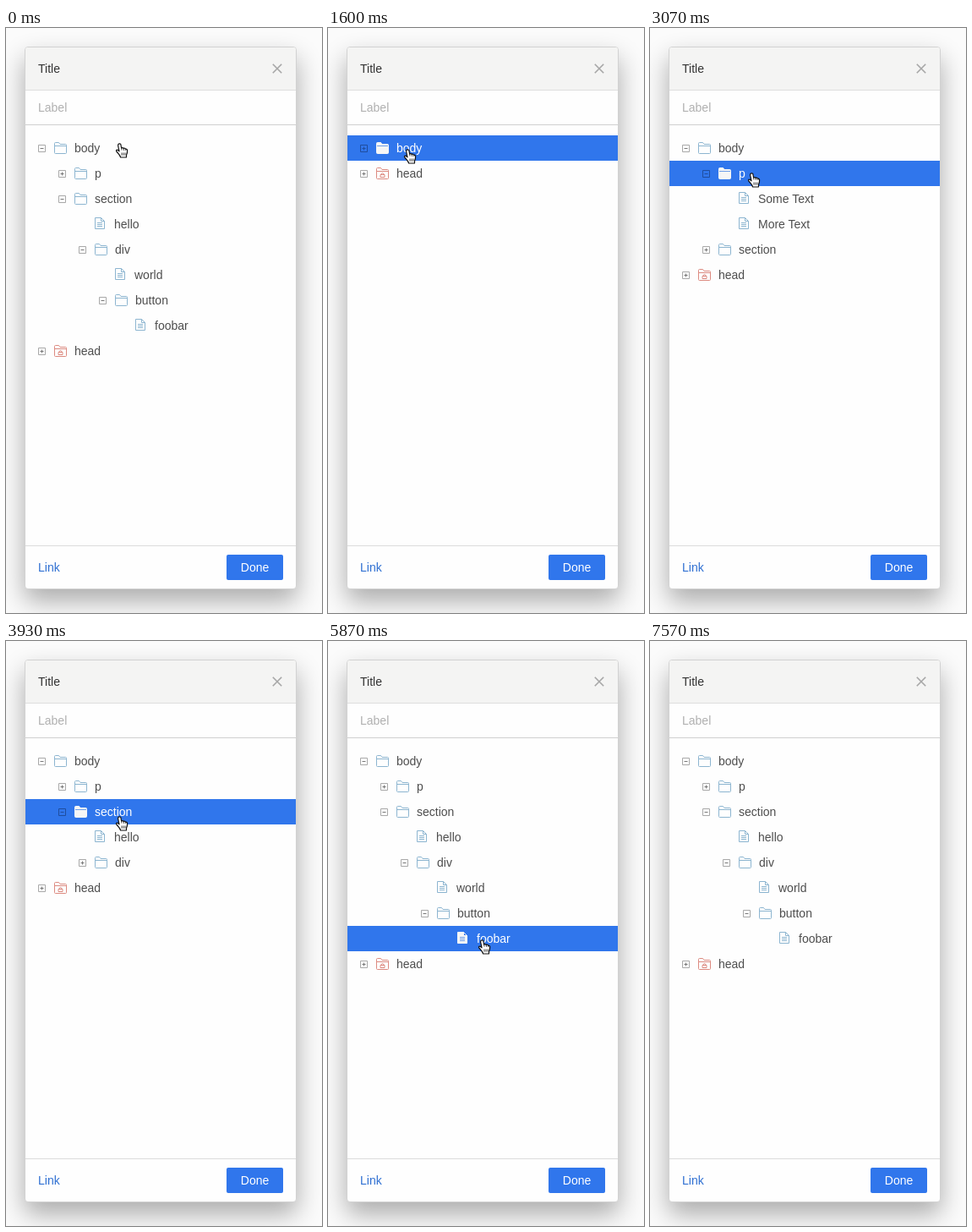
Write an HTML page that moves like this. It is 374 by 692 pixels and loops after 7610 ms.

```html
<!DOCTYPE html>
<html lang="en">
<head>
<meta charset="utf-8">
<title>Tree view</title>
<style>
  html, body { margin: 0; width: 100%; height: 100%; overflow: hidden; background: #fbfbfb; }
  body { position: relative; font: 14px/30px "Liberation Sans", Arial, sans-serif; color: #4d4d4d; }
  .panel {
    position: absolute; left: 22px; top: 22px; width: 320px; height: 640px;
    background: #fefefe; border: 1px solid #d2d2d2; border-radius: 4px;
    box-shadow: 0 14px 30px rgba(0, 0, 0, .32);
  }
  .panel > * { position: absolute; }
  .head { left: 0; right: 0; top: 0; height: 50px; background: #f4f4f3; border-bottom: 1px solid #dedede; border-radius: 3px 3px 0 0; }
  .title { left: 15px; top: 10px; color: #333; }
  .close { left: 292px; top: 19px; stroke: #a6a6a6; stroke-width: 1.6; }
  .label { left: 0; right: 0; top: 51px; height: 40px; padding-left: 15px; line-height: 40px; color: #b0b0b0; border-bottom: 1px solid #d0d0d0; }
  .foot { left: 0; right: 0; top: 589px; border-top: 1px solid #dcdcdc; }
  .link { left: 15px; top: 600px; color: #2f70d2; }
  .done { left: 238px; top: 600px; width: 67px; height: 30px; border-radius: 2px; background: #3076ec; color: #fff; text-align: center; }
  .tree { left: 0; top: 104px; width: 320px; }
  .row { position: absolute; left: 0; width: 320px; height: 30px; }
  .row > * { position: absolute; }
  .row svg { fill: none; stroke: #8cb5d0; overflow: visible; }
  .row .box { stroke: #a8a8a8; }
  .row .sign { stroke: #777; }
  .row.locked .icon { stroke: #dc8a80; }
  .row.hover { background: #3076ec; color: #fff; }
  .row.hover .box, .row.hover .sign { stroke: #1f4d9e; }
  .row.hover .icon { stroke: #f6f6f6; fill: #f6f6f6; }
  .row.hover .ink { stroke: #6f9fe8; }
  .row.open .upright { display: none; }
  #hand { position: absolute; left: 0; top: 0; fill: #fff; stroke: #111; stroke-width: 1.2; stroke-linejoin: round; }
</style>
</head>
<body>
<div class="panel">
  <div class="head"></div>
  <div class="title">Title</div>
  <svg class="close" width="12" height="12"><path d="M.8 .8L11.2 11.2M11.2 .8L.8 11.2"/></svg>
  <div class="label">Label</div>
  <div class="tree"></div>
  <div class="foot"></div>
  <div class="link">Link</div>
  <div class="done">Done</div>
</div>
<svg id="hand" width="17" height="19">
  <path d="M3.6 3.2C3.3 .6 6.4 .1 6.9 2L7.6 6C8.4 5.2 9.8 5.5 10.2 6.5C11 5.9 12.3 6.3 12.6 7.3C13.6 6.9 14.6 7.6 14.6 8.8C14.7 11 14.4 12.5 13.6 14L13.4 17H6.6C6 14.5 3.5 12 1.8 10C.9 8.8 2 7.8 3.2 8.4L5 9.8Z"/>
  <path d="M7.6 6l.5 2.6M10.2 6.5l.4 2.4M12.6 7.3l.2 1.8M8 11.5v3.2M10 11.5v3.2M12 11.5v3.2" stroke-width=".8"/>
</svg>
<script>
const LOOP = 7610;

// name, depth, kind; children follow their parent
const nodes = [
  ['body', 0, 'folder'],
  ['p', 1, 'folder'],
  ['Some Text', 2, 'file'],
  ['More Text', 2, 'file'],
  ['section', 1, 'folder'],
  ['hello', 2, 'file'],
  ['div', 2, 'folder'],
  ['world', 3, 'file'],
  ['button', 3, 'folder'],
  ['foobar', 4, 'file'],
  ['head', 0, 'locked']
].map(([name, depth, kind]) => ({ name, depth, kind }));

const startOpen = ['body', 'section', 'div', 'button'];
const clicks = [
  [640, 'body'], [1950, 'body'], [2600, 'p'], [3330, 'p'],
  [3760, 'section'], [4500, 'div'], [5330, 'button']
];

// pointer tip: time, x, y
const path = [
  [0, 134, 137], [500, 94, 144], [2000, 94, 144], [2500, 120, 172],
  [3350, 120, 172], [3680, 134, 208], [3960, 134, 208], [4400, 140, 268],
  [4560, 140, 268], [5000, 162, 329], [5360, 162, 329], [5740, 182, 354],
  [6350, 182, 354], [6800, 392, 362]
];

const svg = (cls, x, y, body) =>
  `<svg class="${cls}" style="left:${x}px;top:${y}px" width="15" height="14">${body}</svg>`;

const folder = '<path d="M.5 12.5v-11q0-1 1-1h4l1.5 2h6.5q1 0 1 1v9q0 1-1 1h-12q-1 0-1-1z"/><path class="ink" d="M1 4.5h13"/>';
const lock = '<path d="M5 8.5h5v3h-5zM6 8.5v-1q1.5-1.8 3 0v1"/>';
const file = '<path d="M.5 .5h7l4 4v9h-11zM7.5 .5v4h4"/><path class="ink" d="M3 6.5h6M3 8.5h6M3 10.5h6"/>';
const expander = '<path class="box" d="M.5 .5h8v8h-8z"/><path class="sign" d="M2.5 4.5h4"/><path class="sign upright" d="M4.5 2.5v4"/>';

const tree = document.querySelector('.tree');
for (const n of nodes) {
  const x = 24 * n.depth;
  const isFile = n.kind === 'file';
  n.el = document.createElement('div');
  n.el.innerHTML =
    (isFile ? '' : svg('toggle', x + 15, 11, expander)) +
    (isFile ? svg('icon', x + 34, 7, file)
            : svg('icon', x + 34, 8, folder + (n.kind === 'locked' ? lock : ''))) +
    `<span style="left:${x + (isFile ? 57 : 58)}px;white-space:nowrap">${n.name}</span>`;
  tree.append(n.el);
}

// closing a folder also closes everything below it
function openAt(t) {
  const open = new Set(startOpen);
  for (const [time, name] of clicks) {
    if (time > t) break;
    if (!open.has(name)) { open.add(name); continue; }
    const i = nodes.findIndex(n => n.name === name);
    open.delete(name);
    for (let j = i + 1; nodes[j].depth > nodes[i].depth; j++) open.delete(nodes[j].name);
  }
  return open;
}

function pointerAt(t) {
  const i = path.findIndex(p => p[0] > t);
  if (i < 0) return null;
  const [t0, x0, y0] = path[i - 1], [t1, x1, y1] = path[i];
  const u = (t - t0) / (t1 - t0), e = u * u * (3 - 2 * u);
  return [x0 + (x1 - x0) * e, y0 + (y1 - y0) * e];
}

const hand = document.getElementById('hand');

function draw(t) {
  const open = openAt(t), tip = pointerAt(t);
  hand.style.display = tip ? '' : 'none';
  if (tip) hand.style.transform = `translate(${Math.round(tip[0]) - 5}px, ${Math.round(tip[1]) - 1}px)`;
  const inside = tip && t >= 30 && tip[0] < 343;
  const hovered = inside ? Math.floor((tip[1] - 127) / 30) : -1;

  let row = 0, hiddenBelow = Infinity;
  for (const n of nodes) {
    if (n.depth <= hiddenBelow) hiddenBelow = Infinity;
    const shown = hiddenBelow === Infinity;
    n.el.style.display = shown ? '' : 'none';
    if (!shown) continue;
    const isOpen = open.has(n.name);
    if (!isOpen) hiddenBelow = n.depth;
    n.el.style.top = row * 30 + 'px';
    n.el.className = `row ${n.kind}${isOpen ? ' open' : ''}${row === hovered ? ' hover' : ''}`;
    row++;
  }
}

const start = performance.now();
function tick() {
  draw((performance.now() - start) % LOOP);
  requestAnimationFrame(tick);
}
tick();
</script>
</body>
</html>
```
